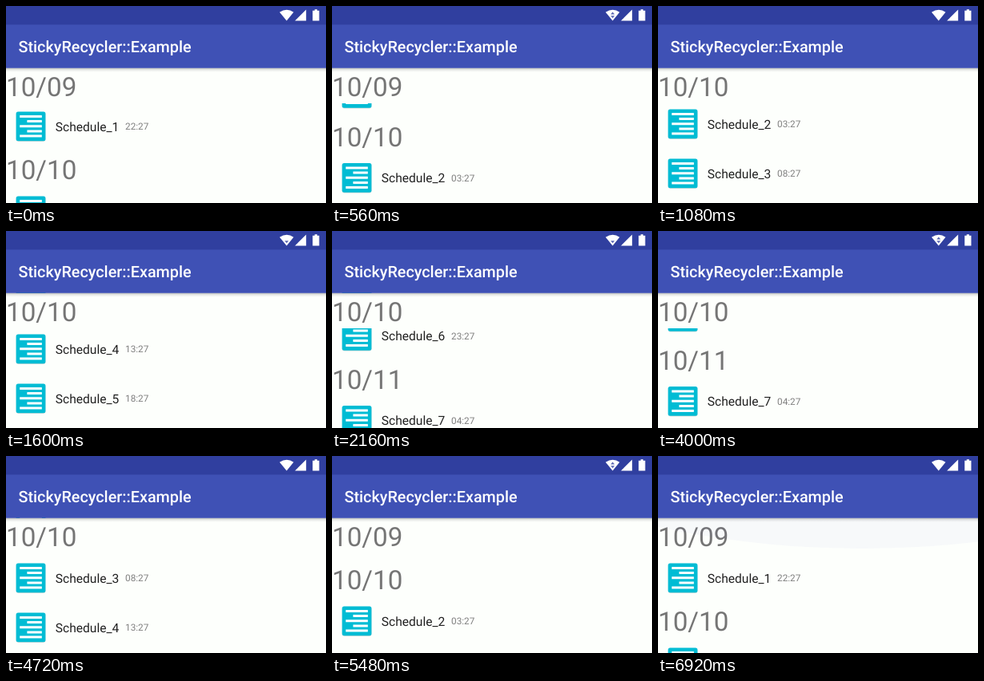
Write an HTML page that moves like this. It is 400 px wide and 247 px high and loops after 6.96 s.

```html
<!DOCTYPE html>
<html lang="en">
<head>
<meta charset="utf-8">
<title>Sticky list</title>
<style>
  html, body { margin: 0; width: 100%; height: 100%; overflow: hidden; background: #fdfffc; }
  svg { display: block; width: 400px; height: 247px; font-family: Roboto, sans-serif; text-rendering: geometricPrecision; }
  .date { font-size: 33.2px; fill: #757575; }
  .name { font-size: 15.6px; fill: #212121; }
  .time { font-size: 11.8px; fill: #808080; }
  .bar { font-size: 19.8px; font-weight: 500; fill: #fff; }
</style>
</head>
<body>
<svg viewBox="0 0 400 247">
  <defs>
    <linearGradient id="shade" x2="0" y2="1">
      <stop stop-color="#000" stop-opacity=".28"/>
      <stop offset=".4" stop-color="#000" stop-opacity=".09"/>
      <stop offset="1" stop-color="#000" stop-opacity="0"/>
    </linearGradient>
    <clipPath id="view"><rect y="77" width="400" height="170"/></clipPath>
    <g id="icon">
      <rect x="12.8" y="-18" width="36.6" height="36.9" rx="3" fill="#000" opacity=".15"/>
      <rect x="12.6" y="-18.6" width="36.8" height="36.8" rx="2.5" fill="#00bcd4"/>
      <path d="M17.200-12.500H44.800M26.400-6.400H44.800M17.200-.2H44.800M26.400 5.900H44.800M17.200 12.100H44.800" stroke="#fff" stroke-width="3"/>
    </g>
  </defs>
  <rect width="400" height="247" fill="#fdfffc"/>
  <g clip-path="url(#view)">
    <g id="list"></g>
    <g id="sticky">
      <rect y="78" width="400" height="44" fill="#fdfffc"/>
      <text class="date" y="113"></text>
    </g>
    <ellipse id="glow" cx="255" rx="600" ry="288" fill="#3f51b5"/>
  </g>
  <rect y="77.800" width="400" height="5" fill="url(#shade)"/>
  <rect width="400" height="77.800" fill="#3f51b5"/>
  <rect width="400" height="23.400" fill="#303f9f"/>
  <text class="bar" x="15.500" y="58">StickyRecycler::Example</text>
  <g fill="#fff">
    <path d="M342 7.800Q351 1.600 359.500 7.800L350.800 18.400Z"/>
    <path d="M361.200 18.400L375.200 4.400V18.400Z"/>
    <path d="M383.300 5.700H385.800V4.300H389V5.700H391.500V18.400H383.300Z"/>
  </g>
  <g fill="#303f9f" opacity=".8">
    <path id="up" d="M348.300 10.400L350.800 7.400L353.300 10.400Z"/>
    <path id="down" d="M348.300 12.200H353.300L350.800 15.200Z"/>
  </g>
</svg>
<script>
const LOOP = 6960, TOP = 78, HEAD = 44, ROW = 62;
const $ = id => document.getElementById(id);
const sections = [];

// Build the list: a row every five hours, a header for every new day
let bottom = 0, html = '';
for (let i = 1, hour = 22; i <= 12; i++, hour += 5) {
  const date = '10/' + String(9 + Math.floor(hour / 24)).padStart(2, '0');
  if (!sections.length || sections.at(-1).date !== date) {
    sections.push({ date, y: bottom });
    html += `<text class="date" y="${TOP + bottom + 35}">${date}</text>`;
    bottom += HEAD;
  }
  const time = String(hour % 24).padStart(2, '0') + ':27';
  html += `<g transform="translate(0 ${TOP + bottom + ROW / 2})"><use href="#icon"/>
    <text class="name" x="61.800" y="5.800">Schedule_${i}</text>
    <text class="time" x="149" y="4.300">${time}</text></g>`;
  bottom += ROW;
}
$('list').innerHTML = html;

// Finger drag: [ms, scroll offset]
const drag = [[0, 2], [1080, 111], [2160, 375.5], [2880, 465], [3200, 506], [3500, 520],
  [4360, 270], [4720, 168], [5040, 115], [5480, 52], [6300, 0], [LOOP, 0]];
const slope = i => (drag[i + 1][1] - drag[i][1]) / (drag[i + 1][0] - drag[i][0]);
function tangent(i) {
  if (i === 0 || i === drag.length - 1) return 0.03 * (i === 0);
  const a = slope(i - 1), b = slope(i);
  return a * b > 0 ? 2 * a * b / (a + b) : 0;
}
function scrollAt(t) {
  let i = 0;
  while (t >= drag[i + 1][0]) i++;
  const [t0, y0] = drag[i], [t1, y1] = drag[i + 1];
  const d = t1 - t0, u = (t - t0) / d, v = 1 - u;
  return y0 * v * v * (1 + 2 * u) + y1 * u * u * (3 - 2 * u)
    + d * u * v * (tangent(i) * v - tangent(i + 1) * u);
}

// Spans of network activity shown by the Wi-Fi arrows
const upload = [[440, 720], [2600, 3120], [4000, 4520], [5000, 6040], [6560, 6800]];
const download = [[440, 720], [1240, 3120], [4000, 4520], [5000, 6040], [6560, 6800]];
function showArrow(id, spans, t) {
  const on = spans.some(([from, to]) => t >= from && t < to);
  $(id).setAttribute('visibility', on ? 'visible' : 'hidden');
}

function draw(now) {
  const t = now % LOOP;
  const scroll = Math.round(scrollAt(t) * 2) / 2;
  $('list').setAttribute('transform', `translate(0 ${-scroll})`);

  const current = sections.findLastIndex(s => s.y <= scroll);
  const next = sections[current + 1];
  const push = next ? Math.min(0, next.y - scroll - HEAD) : 0;
  $('sticky').setAttribute('transform', `translate(0 ${push})`);
  $('sticky').lastElementChild.textContent = sections[current].date;

  const pull = Math.min(1, Math.max(0, (t - 6260) / 660));
  $('glow').setAttribute('cy', TOP + 38 * pull - 288);
  $('glow').setAttribute('opacity', 0.03 * Math.sqrt(pull));

  showArrow('up', upload, t);
  showArrow('down', download, t);
}

const start = performance.now();
function tick() {
  draw(performance.now() - start);
  requestAnimationFrame(tick);
}
tick();
</script>
</body>
</html>
```
